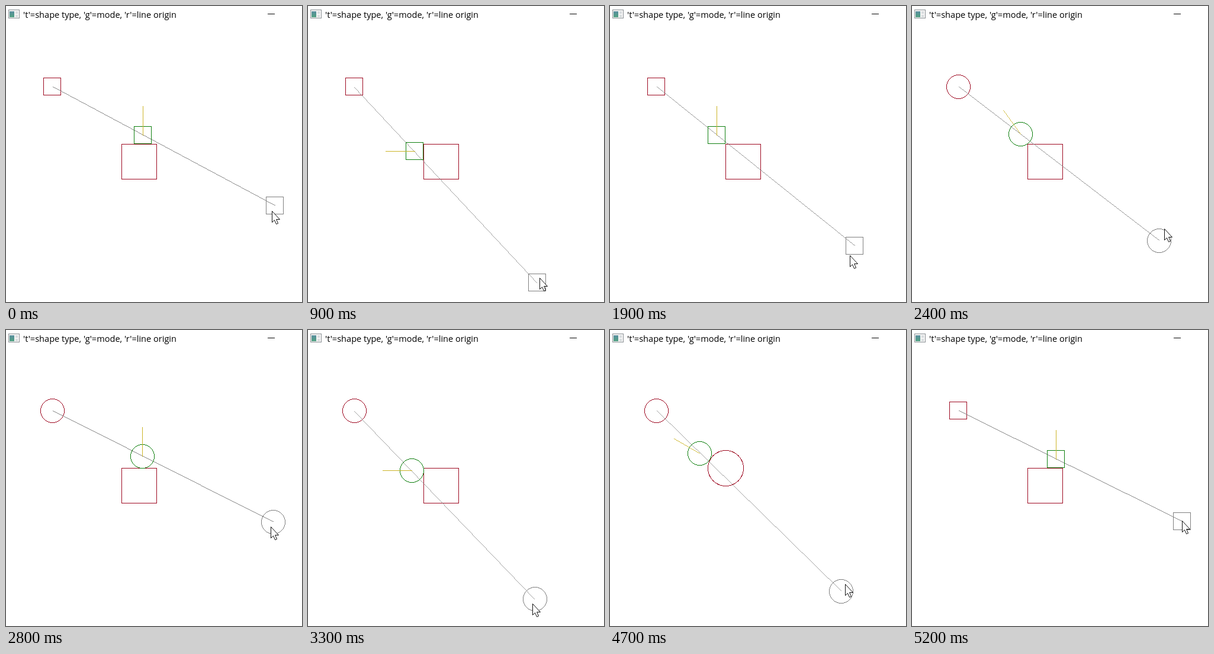
These frames come from a looping animation (500x500 px, 5.3 s). An HTML page:

```html
<!DOCTYPE html>
<html lang="en">
<head>
<meta charset="utf-8">
<title>Shape sweep</title>
<style>
  html, body { margin: 0; width: 100%; height: 100%; overflow: hidden; background: #fff; }
  svg { display: block; }
  text { font: 14.55px "Open Sans", "Noto Sans", sans-serif; }
</style>
</head>
<body>
<svg width="500" height="500" viewBox="0 0 500 500">
  <defs>
    <linearGradient id="pane" x2="0" y2="1">
      <stop stop-color="#5b8fa0"/><stop offset="1" stop-color="#4fa080"/>
    </linearGradient>
  </defs>
  <g shape-rendering="crispEdges">
    <rect x="4.5" y="6.5" width="18" height="14" fill="#f4f4f4" stroke="#8c9296"/>
    <rect x="6" y="9" width="8" height="10" fill="url(#pane)"/>
    <path d="M16 9h4v4h-4zM16 15h4v4h-4z" fill="#d8dcde"/>
    <path d="M442 13.5h12" stroke="#000"/>
  </g>
  <text x="29" y="20">'t'=shape type, 'g'=mode, 'r'=line origin</text>
  <g id="scene" fill="none" shape-rendering="crispEdges"></g>
  <path id="cursor" d="M.5 .5V19.5L4.5 15.7L7.6 22.5L10.6 21.2L7.6 14.5H13.5Z" fill="#fff" stroke="#111"/>
</svg>
<script>
const LOOP = 5300, STEP = 100, CURSOR_LEAD = 60;
const ORIGIN = [78, 136];
const RED = '#9e0a22', GREEN = '#108010', GRAY = '#808080', YELLOW = '#ccb428';

// Turning points of the pointer's swing: time in ms, x, y
const TURNS = [
  [-250, 463, 319.5], [860, 386.3, 468.5], [1490, 457, 319], [2150, 393, 445],
  [2730, 453, 320], [3420, 377.5, 464.6], [4040, 450, 311], [4590, 385, 450], [5230, 456, 322]
];

// The obstacle grown by the mover is a rounded box: half size plus corner radius
const BOXES    = { round: false, roundTarget: false, center: [225, 263], half: 45, radius: 0 };
const DISC_BOX = { round: true,  roundTarget: false, center: [225, 263], half: 30, radius: 20 };
const DISCS    = { round: true,  roundTarget: true,  center: [195, 233], half: 0,  radius: 50 };
const modeAt = t => t < 2100 || t >= 5200 ? BOXES : t < 3500 ? DISC_BOX : DISCS;

function pointerAt(t) {
  const next = TURNS.findIndex(turn => turn[0] > t);
  const [t0, ...from] = TURNS.at(next - 1);
  if (next < 0) return TURNS.at(-1).slice(1);
  const [t1, ...to] = TURNS[next];
  const ease = (1 - Math.cos(Math.PI * (t - t0) / (t1 - t0))) / 2;
  return from.map((v, i) => Math.round(v + (to[i] - v) * ease));
}

// March from the origin towards the end until the grown obstacle is touched
function sweep(end, { center, half, radius }) {
  const delta = end.map((v, i) => v - ORIGIN[i]);
  const length = Math.hypot(...delta);
  let point, normal;
  for (let s = 0, n = 0; n < 200; n++) {
    point = ORIGIN.map((v, i) => v + delta[i] / length * s);
    const offset = point.map((v, i) => v - center[i]);
    const outside = offset.map(v => Math.sign(v) * Math.max(Math.abs(v) - half, 0));
    const dist = Math.hypot(...outside);
    normal = outside.map(v => v / (dist || 1));
    if (dist - radius < 1e-3) break;
    s += dist - radius;
  }
  return { point: point.map(v => Math.floor(v + .01)), normal };
}

const square = (x, y, size, color) =>
  `<rect x="${x + .5}" y="${y + .5}" width="${size}" height="${size}" stroke="${color}"/>`;
const circle = (x, y, r, color) =>
  `<circle cx="${x + .5}" cy="${y + .5}" r="${r}" stroke="${color}"/>`;

// The width keeps a slanted line one pixel thick along its steeper axis
function line([x0, y0], [x1, y1], color) {
  const dx = x1 - x0, dy = y1 - y0;
  const width = Math.max(Math.abs(dx), Math.abs(dy)) / Math.hypot(dx, dy);
  return `<path d="M${x0 + .5} ${y0 + .5}l${dx} ${dy}" stroke="${color}" stroke-width="${width}"/>`;
}

const scene = document.getElementById('scene');
const cursor = document.getElementById('cursor');

function draw(t) {
  const mode = modeAt(t), end = pointerAt(t), hit = sweep(end, mode);
  const mover = ([x, y], color) =>
    mode.round ? circle(x, y, 20, color) : square(x - 15, y - 15, 29, color);
  const tip = hit.point.map((v, i) => v + hit.normal[i] * 50);
  scene.innerHTML =
    (mode.roundTarget ? circle(195, 233, 30, RED) : square(195, 233, 59, RED)) +
    mover(ORIGIN, RED) + mover(end, GRAY) + line(ORIGIN, end, GRAY) +
    mover(hit.point, GREEN) + line(hit.point, tip, YELLOW);
  cursor.setAttribute('transform', `translate(${pointerAt(t + CURSOR_LEAD)})`);
}

const start = performance.now();
function tick() {
  const t = (performance.now() - start) % LOOP;
  draw(Math.floor(t / STEP) * STEP);
  requestAnimationFrame(tick);
}
tick();
</script>
</body>
</html>
```
